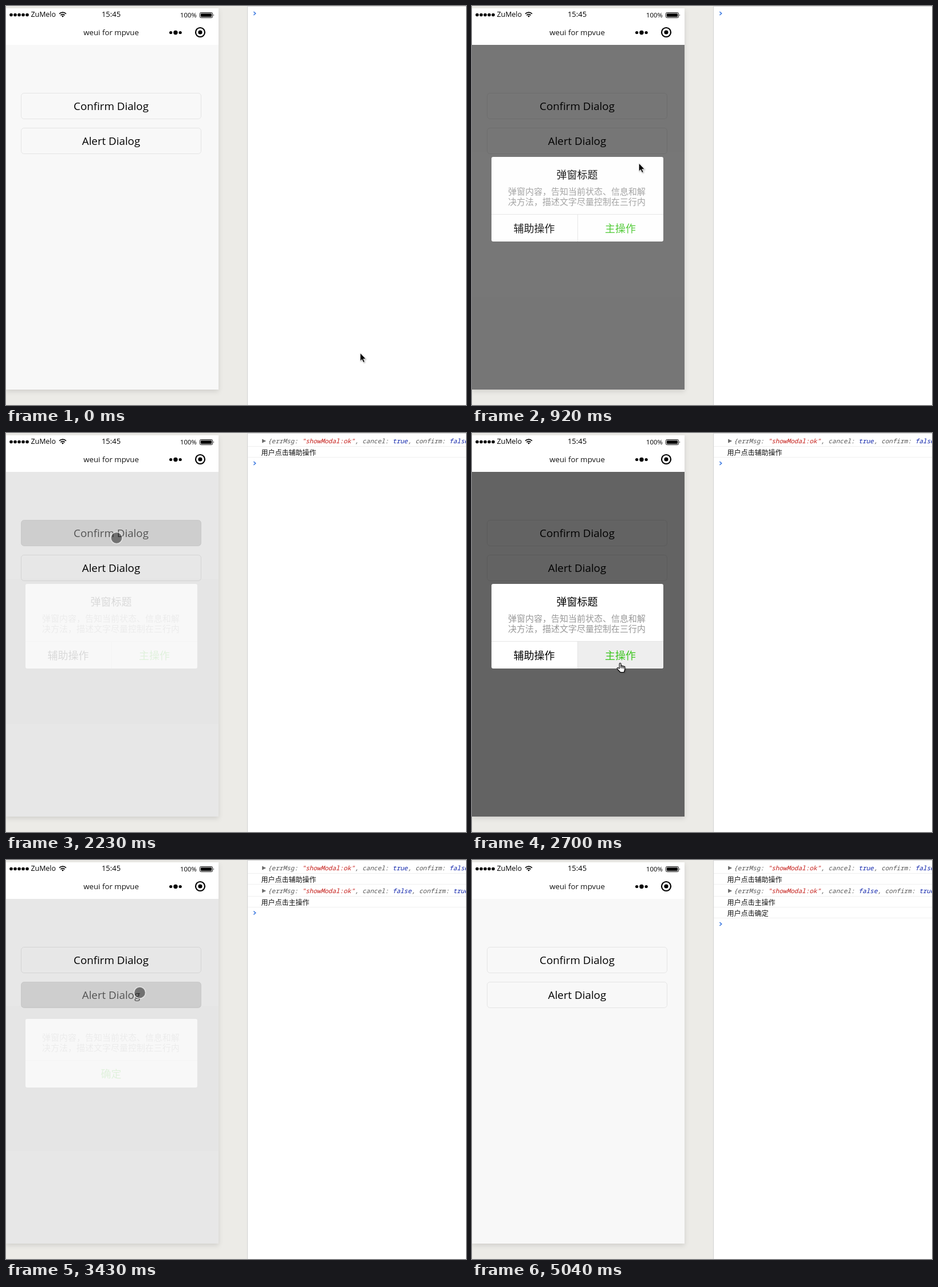
Recreate the animation shown at these times as an HTML page. Size 803 by 698 pixels, loop 5590 ms.

```html
<!DOCTYPE html>
<html lang="zh-CN">
<head>
<meta charset="utf-8">
<title>Dialog demo</title>
<style>
html, body { margin: 0; width: 100%; height: 100%; overflow: hidden; background: #ecebe7; }
svg { display: block; }
text { font-family: "Open Sans", "Noto Sans CJK SC", "Noto Sans CJK", sans-serif; white-space: pre; }
.mid { text-anchor: middle; }
.cjk text, .log { font-family: "Noto Sans CJK SC", "Noto Sans CJK", sans-serif; }
.btn rect { fill: #f8f8f8; stroke: #000; stroke-opacity: .08; }
.btn text { font-size: 18.75px; }
.btn.on rect { fill: #dedede; }
.btn.on text { fill-opacity: .6; }
.dialog { font-size: 18px; opacity: 0; }
.body { font-size: 15px; fill: #999; }
.main { fill: #3cc51f; }
.line { stroke: #e5e5e5; }
.press { fill: #eee; visibility: hidden; }
.press.on { visibility: visible; }
.row { visibility: hidden; }
.row line { stroke: #f0f0f0; }
.log { font-size: 12px; fill: #111; }
.code { font: italic 11px "Noto Sans Mono", "DejaVu Sans Mono", monospace; fill: #565656; }
.str { fill: #c41a16; }
.key { fill: #0d22aa; }
.cursor { filter: drop-shadow(1px 1px 1px rgba(0, 0, 0, .3)); }
</style>
</head>
<body>
<svg width="803" height="698" viewBox="0 0 803 698">
  <rect width="803" height="698" fill="#ecebe7"/>
  <rect y="4" width="371" height="667" fill="#f8f8f8" style="filter:drop-shadow(0 3px 4px rgba(0,0,0,.12))"/>
  <rect y="4" width="371" height="64" fill="#fff"/>

  <g id="dots"></g>
  <text x="43.5" y="19" font-size="12.4">ZuMelo</text>
  <g fill="none" stroke="#000" stroke-width="1.7">
    <path d="M93 13.6Q99 8.6 105 13.6M95.3 16.1Q99 13 102.7 16.1"/>
    <path d="M97 17.6Q99 16 101 17.6L99 19.8Z" fill="#000" stroke="none"/>
  </g>
  <text class="mid" x="183.5" y="19" font-size="13">15:45</text>
  <text x="304" y="20" font-size="11.4">100%</text>
  <rect x="338.5" y="11.5" width="22" height="9" rx="2" fill="#fff" stroke="#000"/>
  <rect x="340" y="13" width="19" height="6" rx="1"/>
  <path d="M362 14v4q1.6-2 0-4Z"/>
  <text class="mid" x="183.5" y="51" font-size="13.3" fill="#111">weui for mpvue</text>
  <circle cx="287.7" cy="46.5" r="2.6"/><circle cx="296" cy="46.5" r="3.7"/><circle cx="304.2" cy="46.5" r="2.6"/>
  <circle cx="339" cy="46" r="8" fill="none" stroke="#000" stroke-width="2.2"/><circle cx="339" cy="46" r="3.6"/>

  <g class="btn" id="confirm">
    <rect x="26.5" y="152.5" width="314" height="45" rx="5"/>
    <text class="mid" x="183.5" y="182">Confirm Dialog</text>
  </g>
  <g class="btn" id="alert">
    <rect x="26.5" y="213.5" width="314" height="45" rx="5"/>
    <text class="mid" x="183.5" y="243">Alert Dialog</text>
  </g>

  <g class="dialog cjk">
    <rect y="68" width="371" height="603" fill-opacity=".6"/>
    <rect x="34" y="264" width="300" height="148" rx="3" fill="#fff"/>
    <path class="press" id="left" d="M34 365H184V412H37Q34 412 34 409Z"/>
    <path class="press" id="right" d="M185 365H334V409Q334 412 331 412H185Z"/>
    <path class="line" d="M34 364.5H334M184.5 365V412"/>
    <text class="mid" x="183.5" y="301.5">弹窗标题</text>
    <text class="body" x="63" y="329.5">弹窗内容，告知当前状态、信息和解</text>
    <text class="body" x="63" y="348">决方法，描述文字尽量控制在三行内</text>
    <text class="mid" x="108.5" y="395.5">辅助操作</text>
    <text class="mid main" x="259" y="395.5">主操作</text>
  </g>
  <g class="dialog cjk">
    <rect y="68" width="371" height="603" fill-opacity=".6"/>
    <rect x="34" y="278" width="300" height="120" rx="3" fill="#fff"/>
    <path class="press" id="ok" d="M34 351H334V395Q334 398 331 398H37Q34 398 34 395Z"/>
    <path class="line" d="M34 350.5H334"/>
    <text class="body" x="63" y="315.5">弹窗内容，告知当前状态、信息和解</text>
    <text class="body" x="63" y="334">决方法，描述文字尽量控制在三行内</text>
    <text class="mid main" x="183.5" y="381">确定</text>
  </g>

  <rect x="421" width="382" height="698" fill="#fff"/>
  <path d="M421.5 698V.5H803" fill="none" stroke="#d2d2d2"/>
  <g class="row">
    <path d="M447 10.5L454 14L447 17.5Z" fill="#6e6e6e"/>
    <text class="code" x="457" y="18">{errMsg: <tspan class="str">"showModal:ok"</tspan>, cancel: <tspan class="key">true</tspan>, confirm: <tspan class="key">false</tspan>}</text>
    <text class="log" x="445.5" y="38.5">用户点击辅助操作</text>
    <line x1="422" x2="803" y1="23.5" y2="23.5"/><line x1="422" x2="803" y1="42.5" y2="42.5"/>
  </g>
  <g class="row">
    <path d="M447 50.5L454 54L447 57.5Z" fill="#6e6e6e"/>
    <text class="code" x="457" y="58">{errMsg: <tspan class="str">"showModal:ok"</tspan>, cancel: <tspan class="key">false</tspan>, confirm: <tspan class="key">true</tspan>}</text>
    <text class="log" x="445.5" y="78.5">用户点击主操作</text>
    <line x1="422" x2="803" y1="63.5" y2="63.5"/><line x1="422" x2="803" y1="82.5" y2="82.5"/>
  </g>
  <g class="row">
    <text class="log" x="445.5" y="97.5">用户点击确定</text>
    <line x1="422" x2="803" y1="101.5" y2="101.5"/>
  </g>
  <path id="prompt" d="M432.3-3L435.6 0L432.3 3" fill="none" stroke="#3a78e0" stroke-width="1.6"/>

  <g id="cursor">
    <path class="cursor" data-kind="arrow" d="M.3 0V14.2L3.4 11.3L5.8 16.6L8.2 15.5L5.8 10.4H10.2Z" stroke="#fff" stroke-width=".8"/>
    <g class="cursor" data-kind="hand" transform="translate(-6 0)" fill="#fff" stroke="#000" stroke-width="1.1" stroke-linejoin="round">
      <path d="M4.8 10V1.8a1.3 1.3 0 0 1 2.6 0V6.2a1.2 1.2 0 0 1 2.4.3 1.2 1.2 0 0 1 2.4.5 1.1 1.1 0 0 1 2.1.7V11.5L12.8 16.5H6.5L1 10.6a1.3 1.3 0 0 1 1.9-1.7Z"/>
      <path d="M7.4 6.2V9.5M9.8 6.5V9.7M12.2 7V10" fill="none"/>
    </g>
    <circle data-kind="touch" r="10" fill="#000" fill-opacity=".45" stroke="#fff" stroke-opacity=".6" stroke-width="1.6"/>
  </g>
</svg>
<script>
const LOOP = 5590, FADE = 200;

// Bursts of evenly spaced picture updates: start, end, count
const bursts = [[70, 300, 4], [460, 610, 3], [760, 1300, 8], [1390, 1930, 8], [2000, 2000, 1],
  [2230, 2700, 7], [2870, 3110, 4], [3430, 3950, 8], [4040, 4580, 8], [4660, 5040, 6]];

// Pointer path: time, x, y, look from then on
const path = [
  [0, 618, 607, 'arrow'], [220, 330, 210, 'arrow'], [300, 274, 137, 'touch'], [610, 274, 168.5, 'touch'],
  [760, 274, 168.5, 'touch'], [820, 280, 215, 'arrow'], [910, 291, 275, 'arrow'], [1070, 200, 350, 'arrow'],
  [1140, 150, 380, 'hand'], [1300, 110, 392, 'hand'], [1540, 110, 392, 'hand'], [1620, 128, 335, 'arrow'],
  [1770, 182, 199, 'arrow'], [1930, 193, 184, 'arrow'], [2000, 193, 183.5, 'touch'], [2230, 193, 183.5, 'touch'],
  [2300, 197, 210, 'arrow'], [2540, 240, 365, 'arrow'], [2610, 252, 392, 'hand'], [2700, 258.5, 402, 'hand'],
  [2870, 258.5, 402, 'hand'], [2950, 255, 345, 'arrow'], [3110, 233.5, 232, 'touch'], [3430, 233.5, 232, 'touch'],
  [3500, 232, 255, 'arrow'], [3720, 224, 335, 'arrow'], [3790, 220, 365, 'hand'], [3950, 216.5, 380, 'hand'],
  [4270, 216.5, 380, 'hand'], [4340, 250, 412, 'arrow'], [4580, 541, 605, 'arrow'], [4660, 590, 610, 'arrow'],
  [4880, 700, 655, 'arrow'], [5040, 720, 704, 'arrow']];

// Dialog index, fade-in start, fade-out start
const shows = [[0, 736, 1601], [0, 2206, 2862], [1, 3406, 4262]];
const presses = { confirm: [[760, 830], [2230, 2300]], alert: [[3430, 3490]],
  left: [[1390, 1540]], right: [[2700, 2870]], ok: [[4040, 4190]] };
const logTimes = [1850, 3110, 4490], promptY = [13, 53, 92.5, 112];

const $ = id => document.getElementById(id);
const all = sel => [...document.querySelectorAll(sel)];
const clamp = v => Math.min(1, Math.max(0, v));
const dialogs = all('.dialog'), rows = all('.row'), looks = all('[data-kind]');

$('dots').innerHTML = [0, 1, 2, 3, 4].map(i => `<circle cx="${9 + 7 * i}" cy="15.5" r="2.8"/>`).join('');

function snap(t) {
  let q = 0;
  for (const [start, end, n] of bursts)
    for (let k = 0; k < n; k++) {
      const at = Math.floor((start + (end - start) * k / Math.max(1, n - 1)) / 10) * 10;
      if (at <= t) q = at;
    }
  return q;
}

function pointer(t) {
  const i = path.findLastIndex(p => p[0] <= t);
  const a = path[i], b = path[i + 1] || a;
  const f = b === a ? 0 : (t - a[0]) / (b[0] - a[0]);
  return [a[1] + (b[1] - a[1]) * f, a[2] + (b[2] - a[2]) * f, a[3]];
}

function draw(time) {
  const t = snap(time % LOOP);

  const alpha = [0, 0];
  for (const [i, open, close] of shows)
    alpha[i] += clamp((t - open) / FADE) - clamp((t - close) / FADE);
  dialogs.forEach((d, i) => d.style.opacity = alpha[i]);

  for (const id in presses)
    $(id).classList.toggle('on', presses[id].some(([from, to]) => t >= from && t < to));

  rows.forEach((r, i) => r.style.visibility = t >= logTimes[i] ? 'visible' : 'hidden');
  const count = logTimes.filter(at => t >= at).length;
  $('prompt').setAttribute('transform', `translate(0 ${promptY[count]})`);

  const [x, y, look] = pointer(t);
  $('cursor').setAttribute('transform', `translate(${x} ${y})`);
  looks.forEach(l => l.style.display = l.dataset.kind === look ? '' : 'none');
}

const begin = performance.now();
function tick() {
  draw(performance.now() - begin);
  requestAnimationFrame(tick);
}
tick();
</script>
</body>
</html>
```
